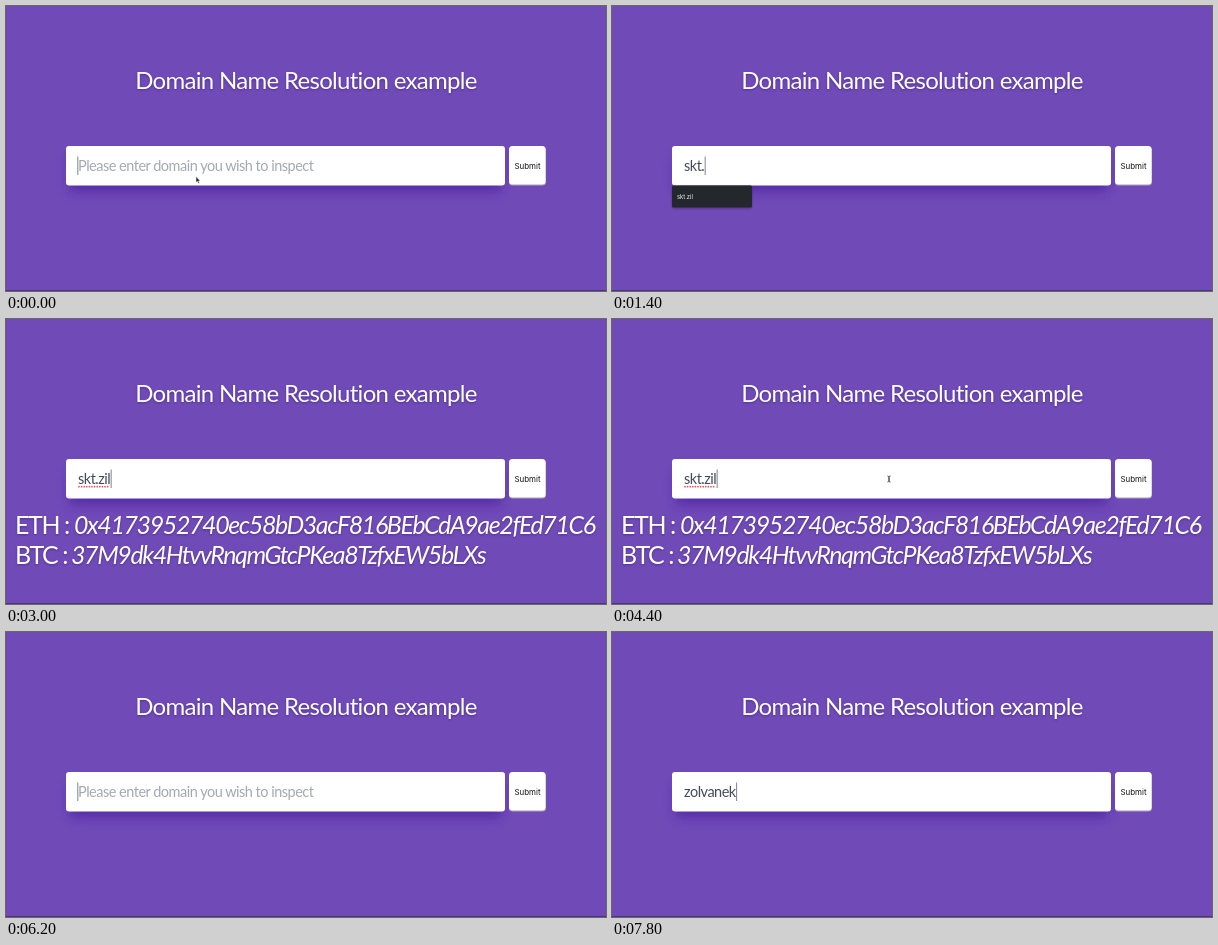
These frames come from a looping animation (600 by 285 pixels, 8000 ms). An HTML page:

```html
<!DOCTYPE html>
<html lang="en">
<head>
<meta charset="utf-8">
<title>Domain Name Resolution example</title>
<style>
  html, body { margin: 0; width: 100%; height: 100%; overflow: hidden; background: #704bb8; }
  svg { display: block; width: 100%; height: 100%; }
  text { font-family: Lato, "Open Sans", sans-serif; white-space: pre; }
  .title { font-size: 24px; letter-spacing: -.7px; fill: #fff; text-anchor: middle; }
  .result { font-size: 25px; letter-spacing: -1.4px; fill: #fff; }
  .value { font-style: italic; }
  .field { font-size: 14.5px; letter-spacing: -.5px; }
  .ui { font-family: Inter, sans-serif; }
  .shade { filter: drop-shadow(0 1px 1px rgba(40, 15, 90, .45)); }
</style>
</head>
<body>
<svg viewBox="0 0 600 285">
  <defs>
    <filter id="blur" x="-10%" y="-60%" width="120%" height="220%">
      <feGaussianBlur stdDeviation="6"/>
    </filter>
  </defs>
  <rect width="600" height="285" fill="#704bb8"/>
  <rect y="284" width="600" height="1" fill="#4d347f"/>
  <text class="title shade" x="300" y="83">Domain Name Resolution example</text>

  <rect x="63" y="150" width="433" height="36" rx="3" fill="#4a1fa0" opacity=".65" filter="url(#blur)"/>

  <g id="results" class="shade">
    <text class="result" x="9" y="215">ETH :</text>
    <text class="result value" x="68" y="215">0x4173952740ec58bD3acF816BEbCdA9ae2fEd71C6</text>
    <text class="result" x="9" y="245">BTC :</text>
    <text class="result value" x="65" y="245">37M9dk4HtvvRnqmGtcPKea8TzfxEW5bLXs</text>
  </g>

  <rect x="60" y="140" width="439" height="39.5" rx="3" fill="#fff"/>
  <rect x="503" y="140.6" width="37" height="39" rx="3.5" fill="#a99fb9"/>
  <rect x="503" y="140" width="36.6" height="38.4" rx="3.5" fill="#fff"/>
  <text class="ui" x="521.5" y="162.6" font-size="7.9" text-anchor="middle" fill="#111">Submit</text>

  <text id="hint" class="field" x="72" y="165" fill="#a3a8b2">Please enter domain you wish to inspect</text>
  <text id="typed" class="field" x="72" y="165" fill="#424a59"></text>
  <path id="spell" d="M73 167.7H103" stroke="#e2564d" stroke-width="1.7" stroke-linecap="round" stroke-dasharray="0 2.6"/>
  <rect id="caret" y="150.5" width="1" height="18.5" fill="#7d8490"/>

  <g id="menu" class="shade">
    <rect x="60" y="179.5" width="80" height="22" rx="1.5" fill="#24272b"/>
    <text class="ui" x="65" y="192.6" font-size="5.8" fill="#f2f2f2">skt.zil</text>
  </g>

  <path id="arrow" d="M190 170.5v6l1.4-1.2 1 2.2 1.1-.5-1-2.1h1.8z" fill="#222" stroke="#fff" stroke-width=".5"/>
  <path id="beam" d="M-1.6-3q1.6 0 1.6 1V2q0 1-1.6 1M1.6-3Q0-3 0-2V2q0 1 1.6 1" fill="none" stroke="#333" stroke-width=".8"/>
</svg>
<script>
const LOOP = 8000, STEP = 200;
const FIRST = "skt.zil", SECOND = "zolvanek";
const $ = id => document.getElementById(id);
const [results, hint, typed, spell, caret, menu, arrow, beam] =
  ["results", "hint", "typed", "spell", "caret", "menu", "arrow", "beam"].map($);

// Each key stroke: time, word, letters left in the field.
const keys = [[0, FIRST, 0]];
for (let i = 1; i <= 7; i++) keys.push([600 + i * 200, FIRST, i]);
keys.push([4600, FIRST, 5], [4800, FIRST, 3], [5000, FIRST, 1], [5200, FIRST, 0]);
[1, 2, 3, 4, 5, 7, 8].forEach((n, i) => keys.push([6600 + i * 200, SECOND, n]));

const show = (el, on) => el.setAttribute("visibility", on ? "visible" : "hidden");
const within = (t, a, b) => t >= a && t < b;

function draw(ms) {
  const t = Math.floor((ms % LOOP) / STEP) * STEP;
  const [last, word, count] = keys.filter(k => k[0] <= t).pop();

  typed.textContent = word.slice(0, count);
  show(hint, count === 0);
  show(results, within(t, 2600, 5400));
  show(spell, within(t, 2600, 4600));
  show(menu, within(t, 800, 2600) || within(t, 4600, 5200));

  const end = count ? 72 + typed.getComputedTextLength() + .4 : 71.3;
  caret.setAttribute("x", end);
  show(caret, (t - last) % 1000 < 500);

  show(arrow, t < 800);
  show(beam, within(t, 3800, 4600));
  const left = 1 - Math.min(1, Math.max(0, (t - 3800) / 400));
  beam.setAttribute("transform", `translate(${277 + 40 * left * left} ${160 + 6 * left * left})`);
}

const start = performance.now();
(function tick() {
  draw(performance.now() - start);
  requestAnimationFrame(tick);
})();
</script>
</body>
</html>
```
